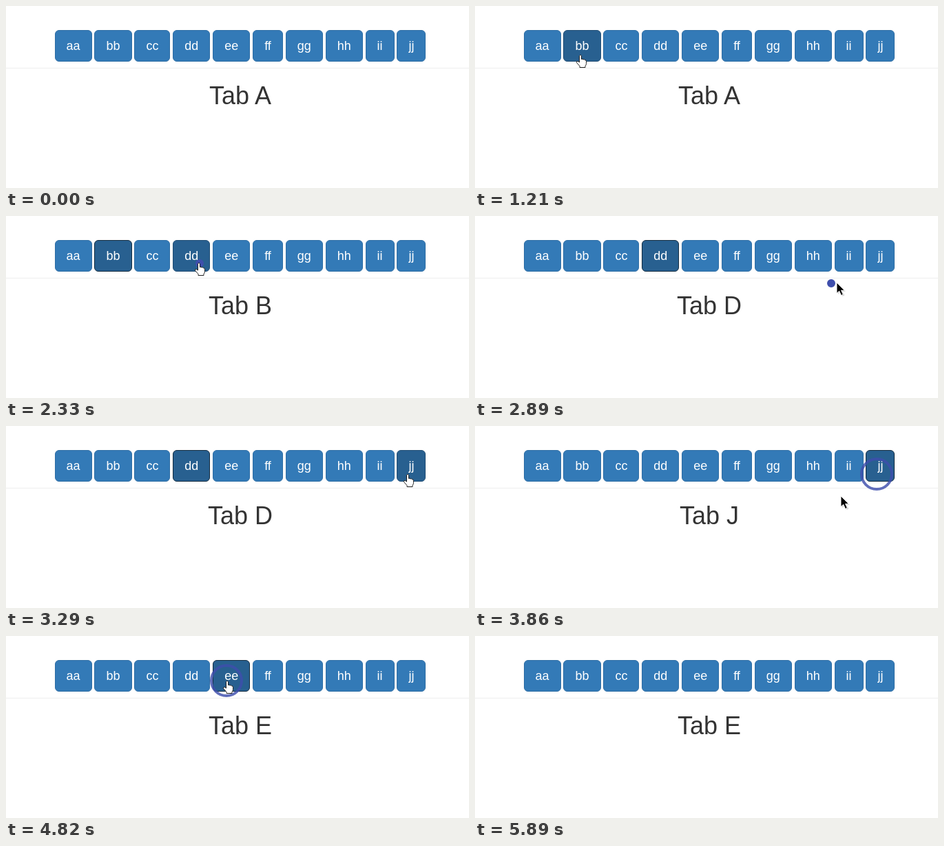
These frames come from a looping animation (672x265 px, 5.97 s). An HTML page:

```html
<!DOCTYPE html>
<html lang="en">
<head>
<meta charset="utf-8">
<title>Tabs</title>
<style>
  html, body { margin: 0; width: 100%; height: 100%; overflow: hidden; background: #fff; }
  body { position: relative; font: 14px/20px "Liberation Sans", Arial, sans-serif; color: #333; }
  nav, h1 { position: absolute; left: 0; width: 680px; margin: 0; text-align: center; white-space: nowrap; }
  nav { top: 35px; }
  nav span {
    display: inline-block; vertical-align: top; box-sizing: border-box; height: 46px;
    padding: 10px 16px; border: 1px solid #2e6da4; border-radius: 6px;
    background: #337ab7; color: #fff; font-size: 18px; line-height: 24px;
  }
  nav .hover { background: #286090; border-color: #204d74; }
  nav .focus { background: #286090; border-color: #122b40; }
  hr { position: absolute; top: 90px; left: 0; width: 100%; height: 1px; margin: 0; border: 0; background: #eee; }
  h1 { top: 111px; font-size: 36px; font-weight: 500; line-height: 1.1; }
  svg { position: absolute; left: 0; top: 0; }
</style>
</head>
<body>
<nav></nav>
<hr>
<h1>Tab A</h1>
<svg width="672" height="265">
  <circle id="ripple" stroke="#3f4fac" stroke-width="4"/>
  <g id="arrow">
    <path d="M2 2V17L5.500 14L8.500 20L11.500 18.500L8.500 13H13Z" fill="#000" opacity=".15"/>
    <path d="M0 0V15.500L3.700 12.200L6.500 18.500L9.300 17.300L6.500 11.300H11.300Z" fill="#000" stroke="#fff" stroke-width=".9"/>
  </g>
  <path id="hand" fill="#fff" stroke="#222" stroke-width="1" stroke-linejoin="round"
    d="M-1.500 11V1.500Q0 -1 1.500 1.500V6.500Q3 5.500 4.200 7Q5.800 6.200 6.700 7.800Q8.500 7.500 8.500 9.500V12.500Q8.500 15 7 16.500V18.500H-1V16.500L-5.500 11.500Q-5.800 9 -3.500 9.500Z"/>
</svg>
<script>
const LOOP = 5970, STEP = 80;
const $ = selector => document.querySelector(selector);

// time, x, y of the pointer tip
const path = [
  [490, 325, 246], [650, 285, 190], [810, 215, 125], [1050, 153, 71], [1690, 153, 71],
  [1850, 180, 90], [2010, 225, 94], [2170, 268, 82], [2250, 280, 68], [2570, 280, 68],
  [2730, 395, 88], [2890, 525, 97], [3050, 570, 84], [3210, 583, 70], [3660, 583, 70],
  [3860, 531, 102], [4100, 435, 109], [4260, 365, 95], [4420, 321, 65], [4820, 321, 65],
  [4900, 316, 100], [5060, 297, 238], [5140, 294, 290]
];
const ripples = [
  { at: 1290, x: 153, y: 71, life: 400 },
  { at: 2330, x: 281, y: 69, life: 400 },
  { at: 2890, x: 517, y: 98, life: STEP },
  { at: 3540, x: 583, y: 70, life: 400 },
  { at: 4500, x: 320, y: 65, life: 400 }
];
const focusChanges = [[0, ""], [1290, "b"], [2410, "d"], [3540, "j"], [4500, "e"], [5890, ""]];
const titleChanges = [[0, "A"], [1370, "B"], [2490, "D"], [3620, "J"], [4820, "E"]];

const letters = [..."abcdefghij"];
$("nav").innerHTML = letters.map(c => `<span>${c}${c}</span>`).join(" ");
const buttons = [...document.querySelectorAll("nav span")];
const boxes = buttons.map(b => b.getBoundingClientRect());

const latest = (changes, t) => changes.filter(([at]) => at <= t).pop()[1];

function pointerAt(t) {
  const i = path.findIndex(([at]) => at > t);
  if (i === 0) return path[0].slice(1);
  if (i < 0) return path[path.length - 1].slice(1);
  const [t0, x0, y0] = path[i - 1], [t1, x1, y1] = path[i];
  const k = (t - t0) / (t1 - t0);
  return [x0 + (x1 - x0) * k, y0 + (y1 - y0) * k];
}

// The picture advances in 80 ms steps, restarted after the pause on "jj".
function stepped(t) {
  if (t < 490) return 0;
  const start = t < 3540 ? 490 : 3540;
  return start + Math.floor((t - start) / STEP) * STEP;
}

function drawPointer(id, visible, x, y) {
  const el = $(id);
  el.style.display = visible ? "" : "none";
  el.setAttribute("transform", `translate(${x} ${y})`);
}

function drawRipple(t) {
  const el = $("#ripple");
  const ripple = ripples.find(r => t >= r.at && t < r.at + r.life);
  el.style.display = ripple ? "" : "none";
  if (!ripple) return;
  const age = t - ripple.at;
  el.setAttribute("cx", ripple.x);
  el.setAttribute("cy", ripple.y);
  el.setAttribute("r", 4 + 18 * age / 320);
  el.setAttribute("fill", age < STEP ? "#3f4fac" : "none");
  el.setAttribute("opacity", 1 - 0.18 * age / 320);
}

function draw(now) {
  const time = now % LOOP, t = stepped(time);
  const visible = t >= 490 && t < 5140;
  const [x, y] = pointerAt(t);
  // Hover reacts one step after the pointer arrives.
  const [hx, hy] = pointerAt(t - STEP);
  const hovered = visible ? boxes.findIndex(b => hx >= b.left && hx < b.right && hy >= b.top && hy < b.bottom) : -1;
  const focused = letters.indexOf(latest(focusChanges, time) || "-");

  buttons.forEach((b, i) => b.className = i === focused ? "focus" : i === hovered ? "hover" : "");
  $("h1").textContent = "Tab " + latest(titleChanges, time);
  drawRipple(t);
  drawPointer("#arrow", visible && hovered < 0, x, y);
  drawPointer("#hand", visible && hovered >= 0, x, y);
}

function frame() {
  draw(performance.now());
  requestAnimationFrame(frame);
}
frame();
</script>
</body>
</html>
```
